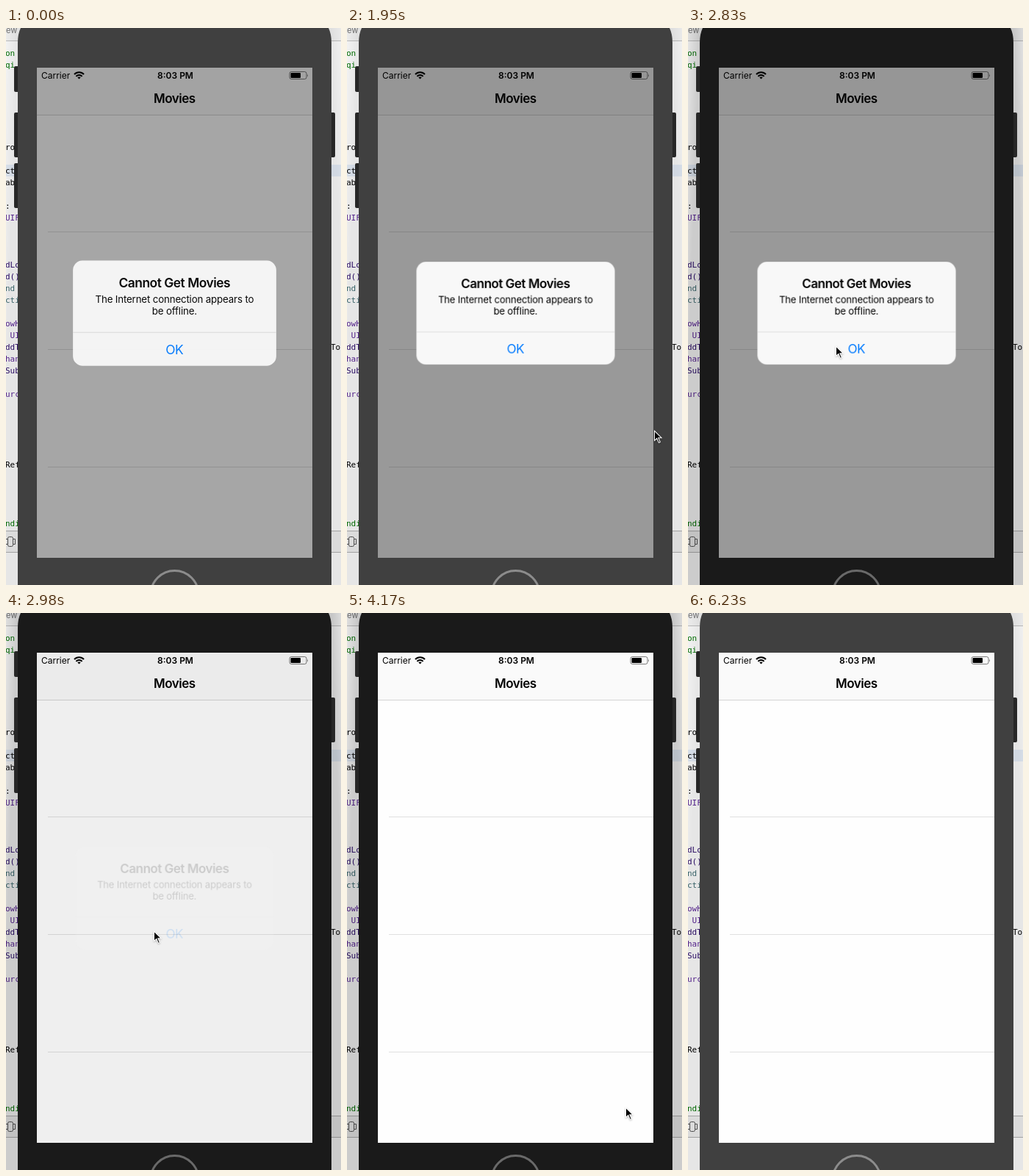
Recreate the animation shown at these times as an HTML page. Size 456 px wide and 758 px high, loop 6.33 s.

```html
<!DOCTYPE html>
<html lang="en">
<head>
<meta charset="utf-8">
<title>Offline alert</title>
<style>
  html, body { margin: 0; width: 100%; height: 100%; overflow: hidden; background: #fff; }
  svg { display: block; width: 456px; height: 758px; }
  text { font-family: Inter, "Open Sans", sans-serif; white-space: pre; }
  .mid { text-anchor: middle; }
  .semi { font-weight: 600; }
  .title { font-size: 17px; font-weight: 600; letter-spacing: -.48px; }
  .note { font-size: 13px; letter-spacing: -.16px; }
  #code text { font: 11px "DejaVu Sans Mono", monospace; }
  #alert { transform-origin: 229.5px 388px; }
  #cursor { filter: drop-shadow(0 1px 1px #0004); }
</style>
</head>
<body>
<svg viewBox="0 0 456 758">
  <defs>
    <linearGradient id="shade" gradientUnits="userSpaceOnUse" x1="-8" y1="0" x2="16" y2=".8">
      <stop offset="0" stop-opacity=".25"/>
      <stop offset="1" stop-opacity="1"/>
    </linearGradient>
  </defs>

  <!-- editor behind the phone -->
  <rect width="456" height="758" fill="#fff"/>
  <rect width="456" height="17" fill="#f8f8f8"/>
  <path d="M0 17.5H456" stroke="#c4c4c4"/>
  <text x="0" y="7" font-size="11" fill="#777">ew</text>
  <rect y="186" width="456" height="16" fill="#e8f0fb"/>
  <rect y="684" width="456" height="30" fill="#f3f3f3"/>
  <path d="M0 684.5H456M0 713.5H456" stroke="#b4b4b4"/>
  <g fill="none" stroke="#555">
    <rect x="2.5" y="692.5" width="7" height="13" rx="2"/>
    <path d="M2 695.5H-1M2 702.5H-1M10 695.5h2.5v7H10"/>
  </g>
  <g id="code"></g>
  <g id="shadow">
    <rect id="side" width="20" height="758" fill="url(#shade)"/>
    <use href="#side" transform="translate(459)scale(-1 1)"/>
  </g>

  <!-- phone -->
  <g fill="#272727">
    <rect x="11" y="52" width="8" height="35" rx="2"/>
    <rect x="11" y="115" width="8" height="61" rx="2"/>
    <rect x="11" y="184" width="8" height="61" rx="2"/>
    <rect x="440" y="115" width="8" height="61" rx="2"/>
  </g>
  <path id="bezel" d="M20 0Q16 8 16 20V758H443V20Q443 8 439 0Z"/>
  <circle id="home" cx="229.5" cy="771" r="32.5" fill="none" stroke-width="3"/>

  <!-- screen -->
  <rect x="42" y="54" width="375" height="667" fill="#fefefe"/>
  <rect x="42" y="54" width="375" height="64" fill="#fafafa"/>
  <path d="M42 118.5H417" stroke="#d4d4d4"/>
  <path d="M57 277.5H417M57 437.5H417M57 597.5H417" stroke="#e0e0e0"/>
  <rect id="dim" x="42" y="54" width="375" height="667"/>
  <text x="48" y="68.5" font-size="12">Carrier</text>
  <g fill="none" stroke="#000" stroke-width="2">
    <path d="M93 63.2a8.6 8.6 0 0 1 13 0M95.4 65.8a5.4 5.4 0 0 1 8.2 0"/>
    <path d="M97.3 67.2q2.2-1.6 4.4 0L99.5 69.6Z" fill="#000" stroke="none"/>
  </g>
  <text class="mid semi" x="230.5" y="68.5" font-size="12">8:03 PM</text>
  <rect x="386" y="59.5" width="23" height="10" rx="2.5" fill="none" stroke="#000" stroke-opacity=".5"/>
  <rect x="387.5" y="61" width="13.5" height="7" rx="1"/>
  <path d="M410 62.5q1.6 2 0 4Z" fill-opacity=".5"/>
  <text class="mid title" x="229.3" y="102">Movies</text>

  <g id="alert">
    <rect x="94.5" y="318" width="270" height="140" rx="13" fill="#f8f8f8"/>
    <path d="M94.5 413.5h270" stroke="#dcdcdc"/>
    <text class="mid title" x="229.3" y="353.5">Cannot Get Movies</text>
    <text class="mid note" x="229.4" y="374">The Internet connection appears to</text>
    <text class="mid note" x="229.4" y="390">be offline.</text>
    <text class="mid" x="229.3" y="442.3" font-size="17" letter-spacing="-.4" fill="#007aff">OK</text>
  </g>

  <g id="cursor">
    <path d="M0 0V15.5L3.6 12.4 6.2 18 9 16.8 6.6 11.3H11.3Z" fill="#fff"/>
    <path d="M1 2.4V13.2L3.9 10.6 6.7 16.7 7.7 16.3 5 10.2H8.9Z"/>
  </g>
</svg>
<script>
const LOOP = 6330;
const byId = id => document.getElementById(id);

// Each step is [start in ms, style]; the style holds until the next step.
function hold(id, steps) {
  const frames = steps.map(([at, style]) => ({ ...style, offset: at / LOOP, easing: 'step-end' }));
  frames.push({ ...steps.at(-1)[1], offset: 1 });
  byId(id).animate(frames, { duration: LOOP, iterations: Infinity });
}

const INK = '#000', GREEN = '#007400', PURPLE = '#5c2699', TEAL = '#3f6e74', NAVY = '#2e0d6e';
const lines = [
  [34, 'on', GREEN], [50, 'qi', GREEN], [162, 'ro', INK], [194, 'ct', INK], [210, 'ab', INK],
  [242, ':', INK], [258, 'UIF', PURPLE], [322, 'dLo', NAVY], [338, 'd()', NAVY],
  [354, 'nd', TEAL], [370, 'cti', TEAL], [402, 'owH', PURPLE], [418, ' UI', PURPLE],
  [434, 'ddT', NAVY], [450, 'han', PURPLE], [466, 'Sub', NAVY], [498, 'urc', PURPLE],
  [594, 'Ref', INK], [674, 'ndi', GREEN], [434, 'Tol', INK, 442],
];
for (const [y, words, color, x = -1] of lines) {
  const row = document.createElementNS('http://www.w3.org/2000/svg', 'text');
  row.setAttribute('x', x);
  row.setAttribute('y', y + 4);
  row.setAttribute('fill', color);
  row.textContent = words;
  byId('code').append(row);
}

const focus = (id, blurred, active) => hold(id, [[0, blurred], [2830, active], [6230, blurred]]);
focus('bezel', { fill: '#404040' }, { fill: '#1a1a1a' });
focus('home', { stroke: '#8c8c8c' }, { stroke: '#696969' });
focus('shadow', { opacity: .1 }, { opacity: .2 });

hold('dim', [[0, .35], [150, .395], [300, .4], [2980, .06], [3130, 0]]
  .map(([at, opacity]) => [at, { opacity }]));

hold('alert', [[0, 1.025, .95], [150, 1.004, .99], [300, 1, 1], [2980, 1, .15], [3130, 1, 0]]
  .map(([at, scale, opacity]) => [at, { transform: `scale(${scale})`, opacity }]));

const AWAY = [-40, -40];
hold('cursor', [
  [0, ...AWAY], [1950, 418, 547], [2090, 251, 472], [2240, 243, 466], [2390, 201, 433],
  [2530, 201, 432], [3280, 206, 433], [3430, 250, 452], [3580, 288, 505], [3880, 339, 595],
  [4020, 378, 668], [4170, 379, 672], [4310, 415, 723], [4460, 421, 737], [4610, 425, 750],
  [4760, ...AWAY],
].map(([at, x, y]) => [at, { transform: `translate(${x}px, ${y}px)` }]));
</script>
</body>
</html>
```
